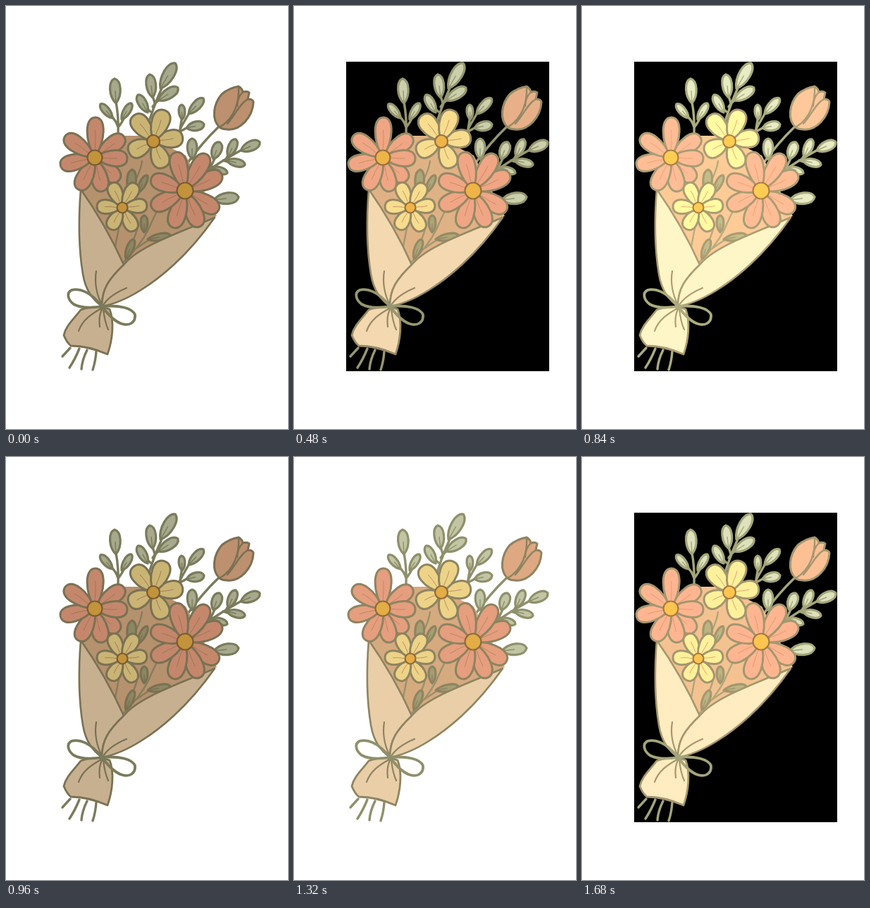
Animation of 400 by 600 pixels, one loop 1800 ms. Source, as an HTML page:

```html
<!DOCTYPE html>
<html lang="en">
<head>
<meta charset="utf-8">
<title>Bouquet</title>
<style>
html, body { margin: 0; width: 100%; height: 100%; overflow: hidden; background: #fff; }
svg { display: block; }
path, circle { stroke-linecap: round; stroke-linejoin: round; }
</style>
</head>
<body>
<svg width="400" height="600" viewBox="0 0 400 600">
  <rect id="backdrop" x="74" y="79" width="288" height="439"/>
  <g id="bouquet" fill="none"></g>
</svg>
<script>
const OLIVE = '#969770', BROWN = '#958a66', MOSS = '#a19871';
const SALMON = '#f0a684', TULIP = '#e8b088', YELLOW = '#f8dd8e', PAPER = '#f4d8b0', INNER = '#dfb285';
const bouquet = document.getElementById('bouquet');
const backdrop = document.getElementById('backdrop');
const parts = [];

const shape = (d, fill = 'none', stroke = BROWN, width = 2.6, extra = '') =>
  parts.push(`<path d="${d}" fill="${fill}" stroke="${stroke}" stroke-width="${width}" ${extra}/>`);
const stem = (d, width = 3.4, color = OLIVE) => shape(d, 'none', color, width);

function place(x, y, degrees) {
  return `transform="translate(${x} ${y}) rotate(${degrees})"`;
}

// A leaf runs from its base to its tip.
function leaf(x, y, tipX, tipY, half, fill = '#cbcfac', stroke = OLIVE) {
  const length = Math.hypot(tipX - x, tipY - y);
  const at = place(x, y, Math.atan2(tipY - y, tipX - x) * 180 / Math.PI);
  const bulge = half * 1.3;
  shape(`M0 0C${length * .3} ${-bulge} ${length * .9} ${-bulge} ${length} 0C${length * .9} ${bulge} ${length * .3} ${bulge} 0 0Z`,
    fill, stroke, 3.2, at);
  shape(`M0 0H${length * .5}`, 'none', stroke, 1.4, at);
}

// Petals are [angle, length] pairs around the heart of the flower.
function flower(x, y, half, heart, fill, petals) {
  for (const [angle, length] of petals) {
    const at = place(x, y, angle), b = half * 1.33;
    shape(`M0 0C${length * .42} ${-b} ${length} ${-b * 1.1} ${length} 0C${length} ${b * 1.1} ${length * .42} ${b} 0 0Z`,
      fill, BROWN, 3, at);
    shape(`M${heart + 2} 0Q${length * .5} 1 ${length * .68} 0`, 'none', '#c08a60', .8, at);
  }
  parts.push(`<circle cx="${x}" cy="${y}" r="${heart}" fill="#eeb448" stroke="#95703f" stroke-width="2.2"/>`);
}

// Sprigs behind the flowers
stem('M159 180Q160 158 156 136M159 172Q156 162 149 156M160 171Q166 163 168 157');
leaf(156, 138, 154, 103, 7.5);
leaf(151, 159, 134, 139, 5);
leaf(164, 161, 178, 138, 5);

stem('M198 180Q208 145 222 114M205 150Q200 146 198 143M211 138Q209 130 207 126M208 143Q214 134 222 130');
leaf(219, 117, 240, 81, 8);
leaf(208, 130, 204, 97, 7);
leaf(216, 134, 244, 116, 7);
leaf(201, 151, 187, 126, 6);

stem('M240 188Q250 168 262 148M247 174L250 156M247 178Q256 173 262 170');
leaf(259, 153, 280, 131, 6);
leaf(250, 161, 249, 140, 4.5);
leaf(256, 173, 281, 168, 6.5);

stem('M302 171Q278 194 258 222');
stem('M280 238Q302 222 336 203M290 229L298 212M313 215L319 207M308 219L318 222M290 232L298 231');
leaf(333, 205, 360, 193, 7);
leaf(315, 214, 326, 189, 6);
leaf(313, 219, 339, 225, 5.5);
leaf(294, 217, 303, 193, 7);
leaf(293, 229, 314, 237, 4.5);
leaf(264, 217, 264, 188, 7);
leaf(295, 275, 330, 271, 8);

// Tulip
shape('M303 172C291 161 294 139 306 125Q317 116 330 114Q335 117 336 122Q342 120 345 123Q344 127 343 132Q350 132 351 136C350 158 332 177 314 175Q307 175 303 172Z', TULIP, BROWN, 3);
shape('M330 114C331 135 325 159 303 172M336 122Q328 130 328 142M343 132C331 139 326 154 314 167', 'none', BROWN, 2.4);

// Inside of the wrapping
shape('M108 262L164 184L200 184L255 212L299 298Q220 327 168 368Z', INNER, 'none', 0);
stem('M164 366Q190 341 202 317Q209 300 220 280M179 348Q193 338 204 331M173 265Q190 240 193 220M160 315L155 341M187 310Q185 325 178 336', 2.4, MOSS);
leaf(177, 266, 179, 232, 6.5, '#aca678', BROWN);
leaf(187, 265, 200, 240, 4.5, '#aca678', BROWN);
leaf(196, 321, 196, 297, 5, '#aca678', BROWN);
leaf(170, 359, 181, 331, 5, '#aca678', BROWN);
leaf(201, 331, 233, 325, 5, '#aca678', BROWN);

// Paper sheets
shape('M106 260C102 310 104 350 109 380C113 405 124 417 136 426C136 402 145 388 167 367C150 329 130 294 106 260Z', PAPER);
shape('M167 367C188 341 240 324 296 300C282 320 262 345 238 367C212 391 172 420 136 426C136 402 145 388 167 367Z', PAPER);
shape('M128 376C125 394 130 412 136 424M171 400Q147 410 138 424', 'none', BROWN, 2.2);

// Cut stems, gathered paper and bow
stem('M91 485L80 497M104 486Q98 501 90 513M115 488Q108 502 107 515M128 490Q127 504 123 516');
shape('M136 427Q119 426 106 431C97 443 85 453 82 467Q86 477 92 482C112 482 128 487 144 494C151 474 154 448 147 430Z', PAPER, BROWN, 2.8);
shape('M135 429C123 436 109 444 103 461M136 430Q131 441 133 455M138 430Q140 448 145 459', 'none', BROWN, 2.2);
stem('M136 426C119 404 103 400 93 403C85 407 88 417 96 423C107 429 124 428 136 426C160 424 179 428 183 438C184 449 175 454 165 451C154 448 145 438 136 426', 3.8);
parts.push(`<circle cx="136" cy="426" r="3.5" fill="${OLIVE}"/>`);

// Blossoms
flower(126, 215, 11, 10.5, SALMON,
  [[44, 47], [77, 49], [117, 51], [167, 50], [216, 52], [-36, 51], [2, 46], [-89, 57]]);
flower(209, 192, 12, 9, YELLOW,
  [[68, 40], [155, 38], [233, 46], [-8, 42], [-70, 47]]);
flower(254, 262, 11.5, 11.5, SALMON,
  [[31, 55], [68, 55], [108, 55], [153, 53], [200, 51], [-24, 57], [-59, 60], [-104, 56]]);
flower(165, 286, 9.5, 7.5, YELLOW,
  [[62, 37], [120, 35], [183, 36], [-114, 38], [-60, 39], [-6, 35]]);

bouquet.innerHTML = parts.join('');

// Light climbs through eight levels, then drops back to the dimmest.
const LOOP = 1800, STEP = 120, LEVELS = 8, NEUTRAL = 4;
const start = performance.now();

function draw(now) {
  const time = Math.max(0, now - start) % LOOP;
  const level = Math.floor(time / STEP) % LEVELS;
  bouquet.style.filter = `brightness(${1 + (level - NEUTRAL) * .046})`;
  backdrop.style.visibility = level < NEUTRAL ? 'hidden' : 'visible';
  requestAnimationFrame(draw);
}
draw(start);
</script>
</body>
</html>
```
